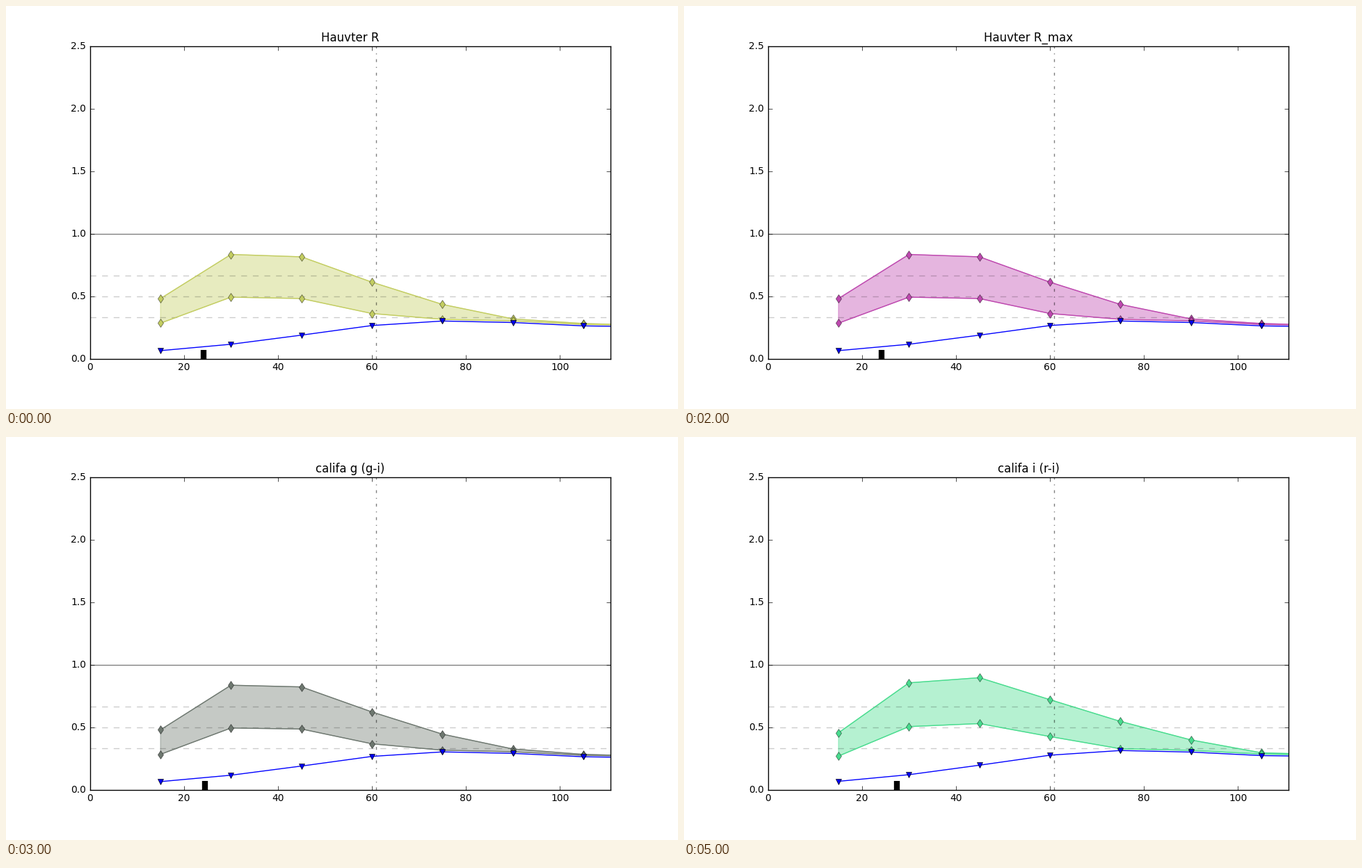
Animation of 966x580 px, one loop 6000 ms. Source, as a matplotlib script:

```python
import matplotlib.pyplot as plt
import numpy as np
from matplotlib.animation import FuncAnimation

plt.style.use("classic")
plt.rcParams.update({
    "font.family": "DejaVu Sans",
    "font.size": 10,
    "figure.facecolor": "white",
    "savefig.facecolor": "white",
    "savefig.dpi": "figure",
})

X = np.arange(15, 121, 15)

# Key shapes of the red and blue bands; other bands lie between them
RED = np.array([.481, .834, .815, .612, .434, .318, .281, .265])
BLUE = np.array([.455, .855, .896, .720, .546, .398, .295, .279])
CURVE = np.array([.064, .115, .188, .265, .301, .289, .262, .254])

# title, colour, mix between the red (0) and blue (1) band
SCENES = [
    ("Hauvter R", "#c3cd61", 0),
    ("Hauvter B", "#c3b6c8", 1),
    ("Hauvter R_max", "#be48af", 0),
    ("califa g (g-i)", "#6e7870", 0.09),
    ("califa r (g-r)", "#9398ca", 0.49),
    ("califa i (r-i)", "#48dc8e", 1),
]


def profiles(mix):
    """Upper bound, lower bound and curve for one mix."""
    top = RED + mix * (BLUE - RED)
    curve = CURVE * (1 + 0.04 * mix)
    bottom = np.maximum(0.59 * top, 1.045 * curve)
    return top, bottom, curve


fig = plt.figure(figsize=(9.66, 5.8), dpi=100)
ax = fig.add_axes([0.125, 0.125, 0.775, 0.775])
ax.set_xlim(0, 110.83)
ax.set_ylim(0, 2.5)
ax.set_xticks(range(0, 101, 20))
ax.set_yticks(np.arange(0, 2.6, 0.5))
title = ax.set_title("")

for level in (1 / 3, 1 / 2, 2 / 3):
    ax.axhline(level, color="k", ls="--", alpha=0.2)
ax.axhline(1, color="k", alpha=0.5)
ax.axvline(60.9, color="k", ls="-.", alpha=0.5)

band, = ax.fill(X, 0 * X, alpha=0.4, lw=1, zorder=1)
edges = [ax.plot(X, 0 * X, "d-", mec=(0, 0, 0, 0.6))[0] for _ in range(2)]
line, = ax.plot(X, 0 * X, "bv-", mec="k")
bar, = ax.plot([0, 0], [0, 0.07], "k", lw=6, solid_capstyle="butt")


def update(i):
    name, color, mix = SCENES[i]
    top, bottom, curve = profiles(mix)
    title.set_text(name)
    band.set_xy(np.column_stack([np.r_[X, X[::-1]], np.r_[top, bottom[::-1]]]))
    band.set_color(color)
    for edge, y in zip(edges, (top, bottom)):
        edge.set_ydata(y)
        edge.set_color(color)
        edge.set_markerfacecolor(color)
    line.set_ydata(curve)
    bar.set_xdata([24.16 + 3.26 * mix] * 2)
    return title, band, *edges, line, bar


anim = FuncAnimation(fig, update, frames=len(SCENES), interval=1000,
                     repeat=True, repeat_delay=0)
plt.show()
```
